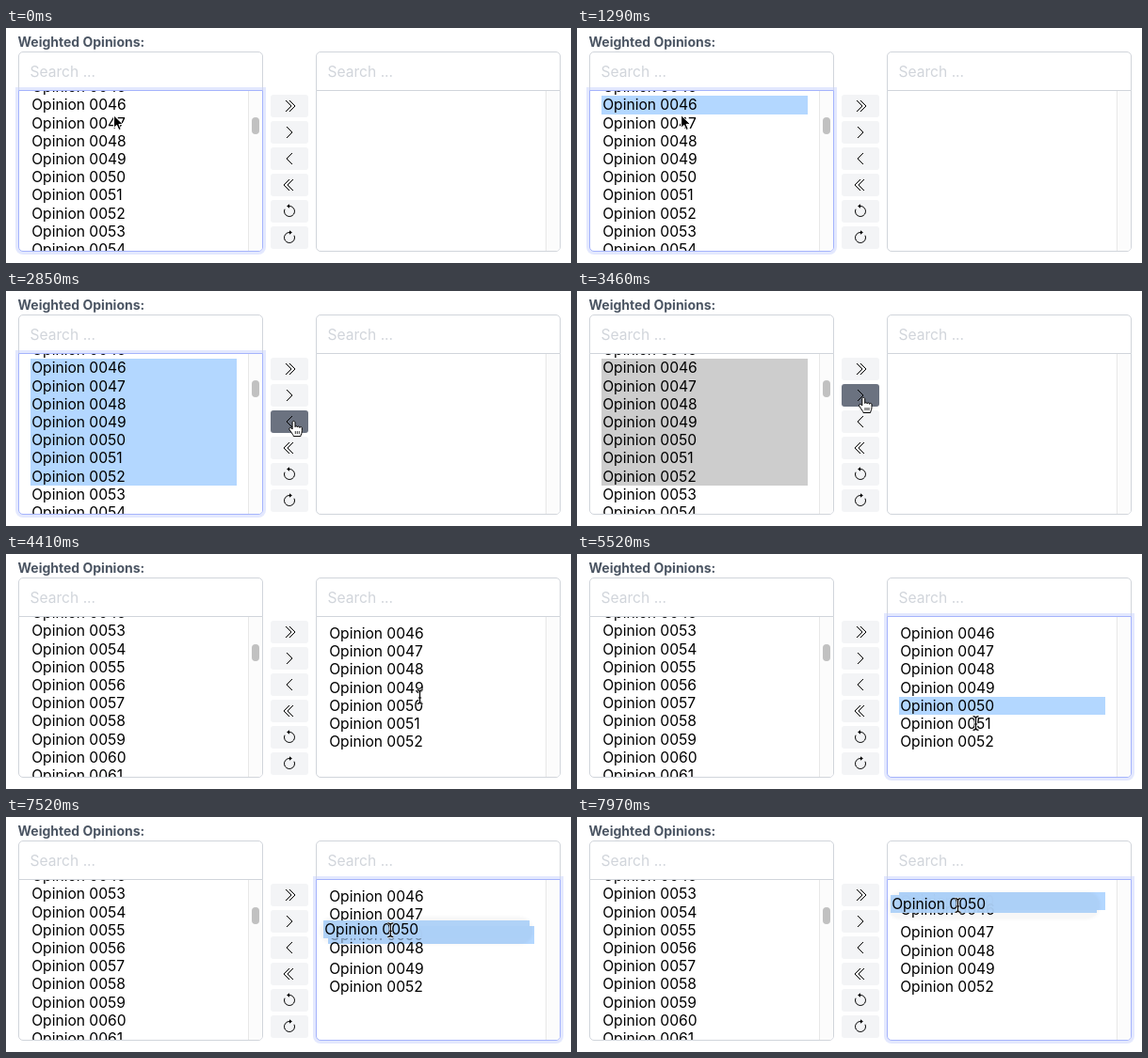
Animation of 600 by 250 pixels, one loop 7990 ms. Source, as an HTML page:

```html
<!DOCTYPE html>
<html lang="en">
<head>
<meta charset="utf-8">
<title>Weighted Opinions</title>
<style>
  html, body { margin: 0; width: 100%; height: 100%; overflow: hidden; background: #fff; }
  body { position: relative; font: 15.6px/19px Inter, "Noto Sans", sans-serif; color: #000; }
  body * { position: absolute; box-sizing: border-box; }
  svg * { position: static; }
  .label { left: 12.5px; top: 5px; font-size: 14px; font-weight: 650; color: #4b5563; white-space: nowrap; }
  .search { top: 25px; width: 260px; height: 42px; padding-left: 11.5px; border: 1px solid #d1d5db;
    border-radius: 5px 5px 0 0; line-height: 42px; color: #d1d5db; }
  .list { top: 66px; width: 260px; height: 172px; border: 1px solid #d1d5db;
    border-radius: 0 0 5px 5px; overflow: hidden; background: #fff; isolation: isolate; }
  .list.focus { border-color: #a5b4fc; box-shadow: 0 0 0 3px #c7d2fe80; }
  .left { left: 13px; }
  .right { left: 329px; }
  .track { left: 243px; top: 0; width: 15px; height: 170px; background: #fcfcfc; border-left: 1px solid #e8e8e8; }
  .thumb { left: 247px; width: 8px; height: 18px; border-radius: 4px; background: #c1c1c1; }
  .row { left: 12px; width: 219px; height: 19px; padding-left: 1.2px; white-space: nowrap; }
  .button { left: 281px; width: 40px; height: 24px; border-radius: 3px; }
  .button svg { left: 12px; top: 4px; width: 16px; height: 16px; fill: none; stroke: #000; }
  #ghost { background: #b3d7fff2; isolation: isolate; }
  #ghost::before { content: ""; position: absolute; inset: -3px -3px -6px; z-index: -1;
    border-radius: 14px; background: #00000008; box-shadow: 0 0 4px #0000000d; }
  .cursor { left: 0; top: 0; width: 16px; height: 19px; overflow: visible; }
</style>
</head>
<body>
<div class="label">Weighted Opinions:</div>
<div class="search left">Search ...</div>
<div class="search right">Search ...</div>
<div class="list left" id="source"><div class="track"></div><div class="thumb" id="thumb"></div></div>
<div class="list right" id="chosen"><div class="track"></div></div>
<div id="buttons"></div>
<div class="row" id="ghost">Opinion 0050</div>
<svg class="cursor" id="arrow">
  <path d="M1 1.4V14.8L4.1 11.9 6.4 17.1 8.7 16.1 6.4 11H10.8Z" stroke="#fff"/>
</svg>
<svg class="cursor" id="hand">
  <path fill="#fff" stroke="#000" d="M5.2.8C4.3.8 3.8 1.5 3.8 2.3V9.4L2.6 8.3C1.9 7.7.9 7.9.6 8.6.3 9.2.6 9.8 1 10.4l3 4.3c.5.8 1 1.4 1 2.3h7.6c0-1.2.5-1.8.9-2.9.4-1.2.5-2 .5-3.3V8.2c0-1.6-2.3-1.6-2.4-.3 0-1.9-2.4-1.8-2.5-.5 0-1.7-2.3-1.6-2.4-.4V2.3C6.6 1.5 6.1.8 5.2.8Z"/>
  <path stroke="#000" stroke-width=".8" d="M7 11.5v3M9 11.5v3M11 11.5v3"/>
</svg>
<svg class="cursor" id="beam" fill="none">
  <path id="halo" stroke="#fff" stroke-width="2.6" d="M1.5 1.2Q4.5 1.2 4.5 3.5V13.5Q4.5 15.8 1.5 15.8M7.5 1.2Q4.5 1.2 4.5 3.5M4.5 13.5Q4.5 15.8 7.5 15.8M2.8 9.5H6.2"/>
</svg>
<script>
const LOOP = 7990, PITCH = 19.2, LEFT_TOP = 72.4, RIGHT_TOP = 75;
const FIRST_PICK = 810, RANGE_PICK = 1980, BLUR = 3460, TRANSFER = 3630;
const CHOSEN_PICK = 4790, SECOND_PICK = 6060, PRESS = 7255, PULL = 7280, DRAG = 7310, DRAG_END = 7970;
const BLUE = '#b3d7ff', GRAY = '#cdcdcd';

const $ = id => document.getElementById(id);
const clamp = u => Math.min(1, Math.max(0, u));
const mix = (a, b, u) => a + (b - a) * u;
const easeOut = u => 1 - (1 - u) ** 2;
const progress = (t, from, length) => easeOut(clamp((t - from) / length));
const show = (el, on) => { el.style.display = on ? '' : 'none'; };

const HOME = { x: 114.5, y: 92.5 }, GRIP_Y = 156, DROP_Y = 94;
// Each pointer move eases to its goal.
const MOVES = [
  { from: 330, to: 660, x: 111, y: 84 },
  { from: 1270, to: 1800, x: 106, y: 192 },
  { from: 2260, to: 2520, x: 290, y: 97 },
  { from: 2520, to: 2640, x: 306, y: 143 },
  { from: 2830, to: 3130, x: 304.5, y: 114 },
  { from: 4205, to: 4410, x: 439.5, y: 152 },
  { from: 5065, to: 5210, x: 427.5, y: 175 },
  { from: 5365, to: 5520, x: 423.5, y: 180 },
  { from: 6370, to: 6810, x: 413.5, y: 162 },
  { from: PRESS, to: PULL, x: 413.5, y: GRIP_Y },
  { from: PULL, to: DRAG_END, x: 404.5, y: DROP_Y }
];
const pointerAt = t => MOVES.reduce((p, m) => {
  const u = progress(t, m.from, m.to - m.from);
  return { x: mix(p.x, m.x, u), y: mix(p.y, m.y, u) };
}, HOME);

const HOTSPOT = { arrow: [1, 1], hand: [5.5, 1.5], beam: [4.5, 8.5] };
function shapeAt({ x, y }, t) {
  if (x >= 281 && x <= 321) return 'hand';
  const overText = x > 342 && t > TRANSFER;
  return overText && !(t >= PULL && t < DRAG) ? 'beam' : 'arrow';
}

const path = d => `<path d="${d}"/>`;
const flip = shape => `<g transform="matrix(-1 0 0 1 16 0)">${shape}</g>`;
const all = path('M4 2l6 6-6 6M8 2l6 6-6 6'), one = path('M5 2l6 6-6 6');
const turn = path('M8 2.5A5.5 5.5 0 1 1 3 5.7') + '<path fill="#000" stroke="none" d="M8 .2V4.8L5.1 2.5Z"/>';
const buttonTop = i => 71 + 28 * i;

function add(parent, className, html) {
  const el = document.createElement('div');
  el.className = className;
  el.innerHTML = html;
  parent.append(el);
  return el;
}
const buttons = [all, one, flip(one), flip(all), turn, flip(turn)].map((icon, i) => {
  const el = add($('buttons'), 'button', `<svg viewBox="0 0 16 16">${icon}</svg>`);
  el.style.top = buttonTop(i) + 'px';
  return el;
});
const makeRows = (list, first, last) => Array.from({ length: last - first + 1 }, (_, i) =>
  ({ el: add(list, 'row', 'Opinion 00' + (first + i)), n: first + i }));
const sourceRows = makeRows($('source'), 45, 61);
const chosenRows = makeRows($('chosen'), 46, 52);

const ink = $('halo').cloneNode();
ink.setAttribute('stroke', '#000');
ink.setAttribute('stroke-width', 1.2);
$('beam').append(ink);

function place(el, y, color) {
  const top = Math.round(y);
  el.style.top = top - 67 + 'px';
  el.style.height = Math.round(y + PITCH) - top + 'px';
  el.style.background = color;
}

function drawSource(t) {
  const moved = t >= TRANSFER, focused = t < BLUR;
  const lastPicked = t < FIRST_PICK ? 0 : t < RANGE_PICK ? 46 : 52;
  $('source').classList.toggle('focus', focused);
  $('thumb').style.top = (moved ? 29 : 28) + 'px';
  for (const { el, n } of sourceRows) {
    const picked = n >= 46 && n <= lastPicked;
    const slot = n - 46 - (moved && n > 52 ? 7 : 0);
    show(el, !(moved && n >= 46 && n <= 52));
    place(el, LEFT_TOP + PITCH * slot, !picked ? 'none' : focused ? BLUE : GRAY);
  }
}

// A row gives way once the dragging pointer reaches its lower edge.
function giveWay(n, t) {
  const edge = RIGHT_TOP + PITCH * (n - 45) + .5;
  const part = (GRIP_Y - edge) / (GRIP_Y - DROP_Y);
  const crossed = PULL + (DRAG_END - PULL) * (1 - Math.sqrt(1 - part));
  return progress(t, Math.max(crossed, DRAG), 150);
}
function slotAt(n, t) {
  if (n < 50) return n - 46 + giveWay(n, t);
  if (n === 50) return 4 - [46, 47, 48, 49].reduce((sum, k) => sum + giveWay(k, t), 0);
  return n - 46 - progress(t, DRAG, 150);
}

function drawChosen(t) {
  const dragging = t >= DRAG;
  $('chosen').classList.toggle('focus', t >= CHOSEN_PICK);
  for (const { el, n } of chosenRows) {
    const picked = (n === 50 && t >= CHOSEN_PICK) || (n === 51 && t >= SECOND_PICK);
    show(el, t >= TRANSFER && !(dragging && n === 51));
    place(el, RIGHT_TOP + PITCH * slotAt(n, t), picked ? BLUE : 'none');
    el.style.zIndex = n === 50 ? 0 : 1;
    el.style.color = dragging && n === 50 ? '#00000059' : '#000';
  }
}

function drawPointer(t) {
  const p = pointerAt(t), shape = shapeAt(p, t);
  for (const id in HOTSPOT) {
    const [dx, dy] = HOTSPOT[id];
    show($(id), id === shape);
    $(id).style.transform = `translate(${p.x - dx}px, ${p.y - dy}px)`;
  }
  show($('ghost'), t >= DRAG);
  $('ghost').style.left = Math.round(p.x - 71.5) + 'px';
  $('ghost').style.top = Math.round(p.y - 10.6) + 'px';
}

// Hover fades in and out: the share of the last 100 ms spent over the button.
function hoverAt(i, t) {
  const steps = 10;
  let inside = 0;
  for (let k = 0; k < steps; k++) {
    const { x, y } = pointerAt(t - 100 * k / steps);
    inside += x >= 281 && x <= 321 && y >= buttonTop(i) && y <= buttonTop(i) + 24;
  }
  return inside / steps;
}
function drawButtons(t) {
  buttons.forEach((el, i) => {
    const u = hoverAt(i, t);
    el.style.background = `rgb(${mix(243, 107, u)}, ${mix(244, 114, u)}, ${mix(246, 128, u)})`;
  });
}

const start = performance.now();
function tick() {
  const t = (performance.now() - start) % LOOP;
  drawSource(t);
  drawChosen(t);
  drawButtons(t);
  drawPointer(t);
  requestAnimationFrame(tick);
}
tick();
</script>
</body>
</html>
```
